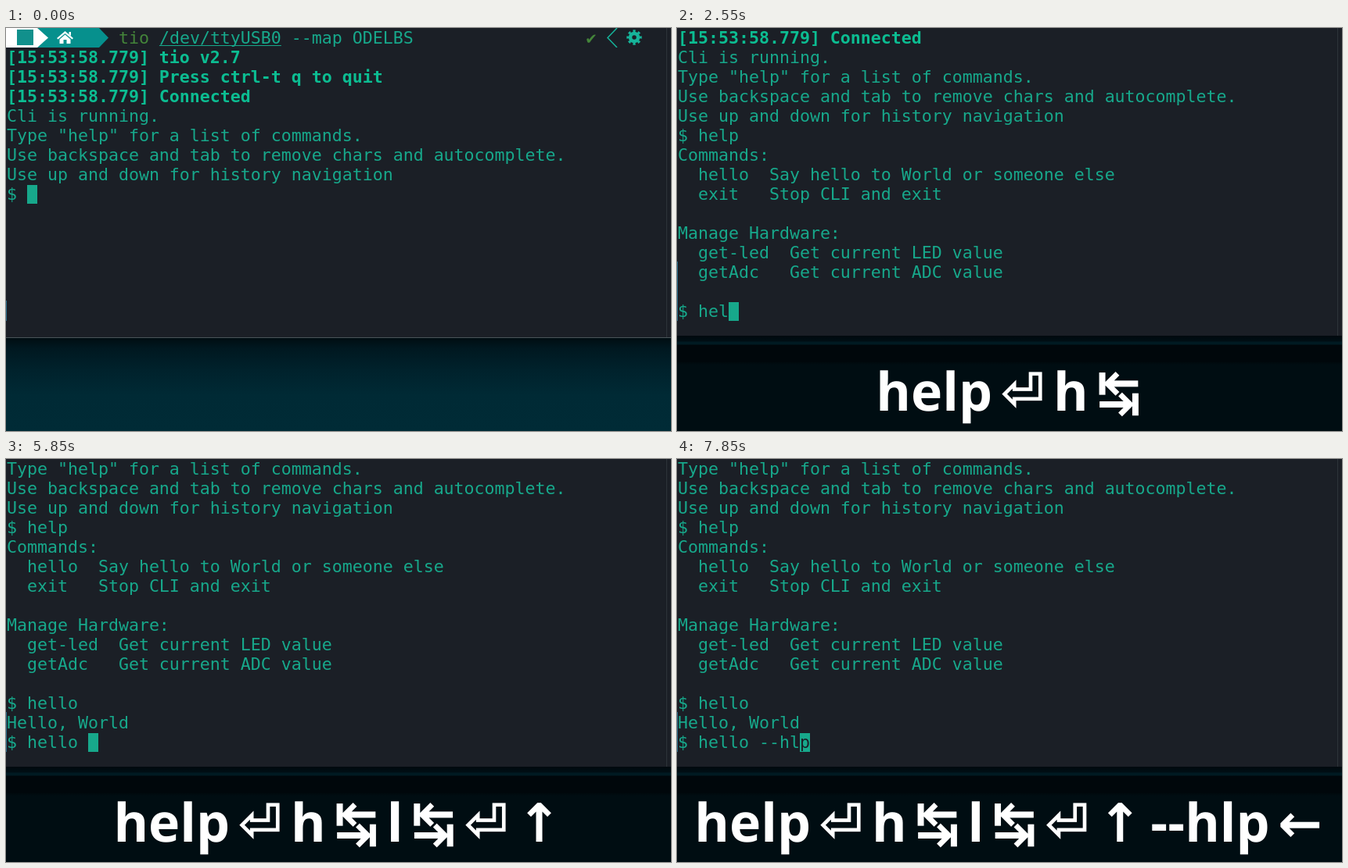
An HTML page for the animation above (8000 ms loop, 850 by 516 pixels).

```html
<!DOCTYPE html>
<html lang="en">
<head>
<meta charset="utf-8">
<title>Serial terminal session</title>
<style>
  html, body { margin: 0; width: 100%; height: 100%; overflow: hidden; background: #002b36; }
  #stage {
    position: relative; width: 850px; height: 516px; overflow: hidden;
    background: linear-gradient(#000d12 397px, #001820 410px, #00222c 438px, #002a35 470px, #002b36);
  }
  #term {
    position: absolute; left: 0; top: 0; width: 850px; height: 396px; overflow: hidden;
    background: #1b1f26; border-bottom: 1px solid #4a5559;
    font: 21.593px/25px "DejaVu Sans Mono", monospace; color: #17a88b; white-space: pre;
  }
  #term::after {
    content: ""; position: absolute; left: 844px; top: 0; width: 1px; height: 100%; background: #2d3339;
  }
  #rows { position: absolute; left: 1px; top: 0; }
  #rows div { position: relative; height: 25px; }
  #rows b { color: #0cbd92; }
  #rows svg { position: absolute; left: -1px; top: 0; }
  .cmd { color: #44853a; }
  .path { text-decoration: underline 1px; text-underline-offset: 2px; text-decoration-skip-ink: none; }
  .home { color: #fff; font-weight: bold; }
  .cursor {
    display: inline-block; height: 25px; vertical-align: top; color: #1b1f26;
    background: linear-gradient(transparent 1px, #17a88b 1px);
  }
  #mark { position: absolute; left: 0; bottom: 21px; width: 1px; background: #2a6f8c; }
  #bar {
    position: absolute; left: 0; top: 394px; width: 850px; height: 122px;
    background: linear-gradient(#00090e, #000e14 7px, #001a22 8px, #001a22 11px,
      #00070b 12px, #00070b 33px, #000d12 37px);
  }
  /* zero line height puts the baseline at y = 490 */
  #keys {
    position: absolute; left: 423.7px; top: 69.5px; transform: translateX(-50%);
    font: bold 68px/0 "Noto Sans", "Open Sans", sans-serif;
    color: #fff; white-space: nowrap; text-rendering: geometricPrecision;
  }
  #keys .sym { font-family: "DejaVu Sans", sans-serif; }
  #keys .gap { margin-left: 10.5px; }
  #keys .new { text-decoration: underline 3px; text-underline-offset: 5px; text-decoration-skip-ink: none; }
  #keys .sym.new { text-underline-offset: 1px; }
</style>
</head>
<body>
<div id="stage">
  <div id="term"><div id="rows"></div><div id="mark"></div></div>
  <div id="bar"><div id="keys"></div></div>
</div>

<template id="prompt"><svg width="850" height="25">
  <path d="M40 0H119L131 12.5 119 25H40Z" fill="#06908d"/>
  <path d="M0 0H40L54 12.5 40 25H0Z" fill="#fff"/>
  <rect x="14" y="2" width="21" height="20" fill="#11908c"/>
  <path d="M75.500 4L86 13 84.500 14.500 75.500 7 66.500 14.500 65 13ZM80.500 5H83V10L80.500 8ZM75.500 8.500L82.500 14.500V20H77.500V15H73.500V20H68.500V14.500Z" fill="#fff"/>
  <g fill="none" stroke="#16b49a">
    <path d="M781 0L769 12.500 781 25" stroke-width="1.5"/>
    <circle cx="803" cy="12" r="5" stroke-width="4.500"/>
    <circle cx="803" cy="12" r="8.200" stroke-width="3" pathLength="16" stroke-dasharray="1 1" stroke-dashoffset=".5"/>
  </g>
</svg><span>       </span><span class="home">~</span>   <span class="cmd">tio</span> <span class="path">/dev/ttyUSB0</span> --map ODELBS                 <span class="cmd">✔</span></template>

<script>
const LOOP = 8000, UNDERLINE = 250;
const $ = id => document.getElementById(id);
const bold = text => `<b>[15:53:58.779] ${text}</b>`;

const lines = [
  $("prompt").innerHTML,
  bold("tio v2.7"),
  bold("Press ctrl-t q to quit"),
  bold("Connected"),
  "Cli is running.",
  'Type "help" for a list of commands.',
  "Use backspace and tab to remove chars and autocomplete.",
  "Use up and down for history navigation",
  "$ help",
  "Commands:",
  "  hello  Say hello to World or someone else",
  "  exit   Stop CLI and exit",
  "",
  "Manage Hardware:",
  "  get-led  Get current LED value",
  "  getAdc   Get current ADC value",
  "",
  "$ hello",
  "Hello, World"
];

// Terminal pages: lines printed, lines scrolled away, rows marked as new
const pages = [
  { printed: 8, scroll: 0, fresh: 1 },
  { printed: 17, scroll: 3, fresh: 3 },
  { printed: 19, scroll: 5, fresh: 2 }
];

// Key presses: time, key, resulting input
const presses = [
  [650, "h", "h"], [800, "e", "he"], [950, "l", "hel"], [1100, "p", "help"], [1250, "⏎", ""],
  [2050, "h", "h"], [2250, "↹", "hel"], [3500, "l", "hell"], [3700, "↹", "hello "], [4950, "⏎", ""],
  [5600, "↑", "hello "], [6600, "-", "hello -"], [6750, "-", "hello --"],
  [7000, "h", "hello --h"], [7100, "l", "hello --hl"], [7200, "p", "hello --hlp"],
  [7600, "←", "hello --hlp"]
];
const isSymbol = key => "⏎↹↑←".includes(key);

function drawTerminal(done) {
  const page = pages[done.filter(p => p[1] === "⏎").length];
  const [, key, input] = done.at(-1) || [0, "", ""];
  const at = key === "←" ? input.length - 1 : input.length;
  const prompt = `$ ${input.slice(0, at)}<span class="cursor">${input[at] || " "}</span>`;
  $("rows").innerHTML = [...lines.slice(page.scroll, page.printed), prompt]
    .map(line => `<div>${line}</div>`).join("");
  $("mark").style.height = page.fresh * 25 + 1 + "px";
}

function drawKeys(done, fresh) {
  $("bar").hidden = !done.length;
  $("keys").innerHTML = done.map(([, key], i) => {
    const sym = isSymbol(key);
    const gap = i > 0 && (sym || isSymbol(done[i - 1][1]));
    const recent = fresh && i === done.length - 1;
    return `<span class="${sym ? "sym" : ""} ${gap ? "gap" : ""} ${recent ? "new" : ""}">${key}</span>`;
  }).join("");
}

let shown = "";
function frame() {
  const t = performance.now() % LOOP;
  const done = presses.filter(p => p[0] <= t);
  const fresh = done.length > 0 && t - done.at(-1)[0] < UNDERLINE;
  const state = done.length + "/" + fresh;
  if (state !== shown) {
    shown = state;
    drawTerminal(done);
    drawKeys(done, fresh);
  }
  requestAnimationFrame(frame);
}
frame();
</script>
</body>
</html>
```
